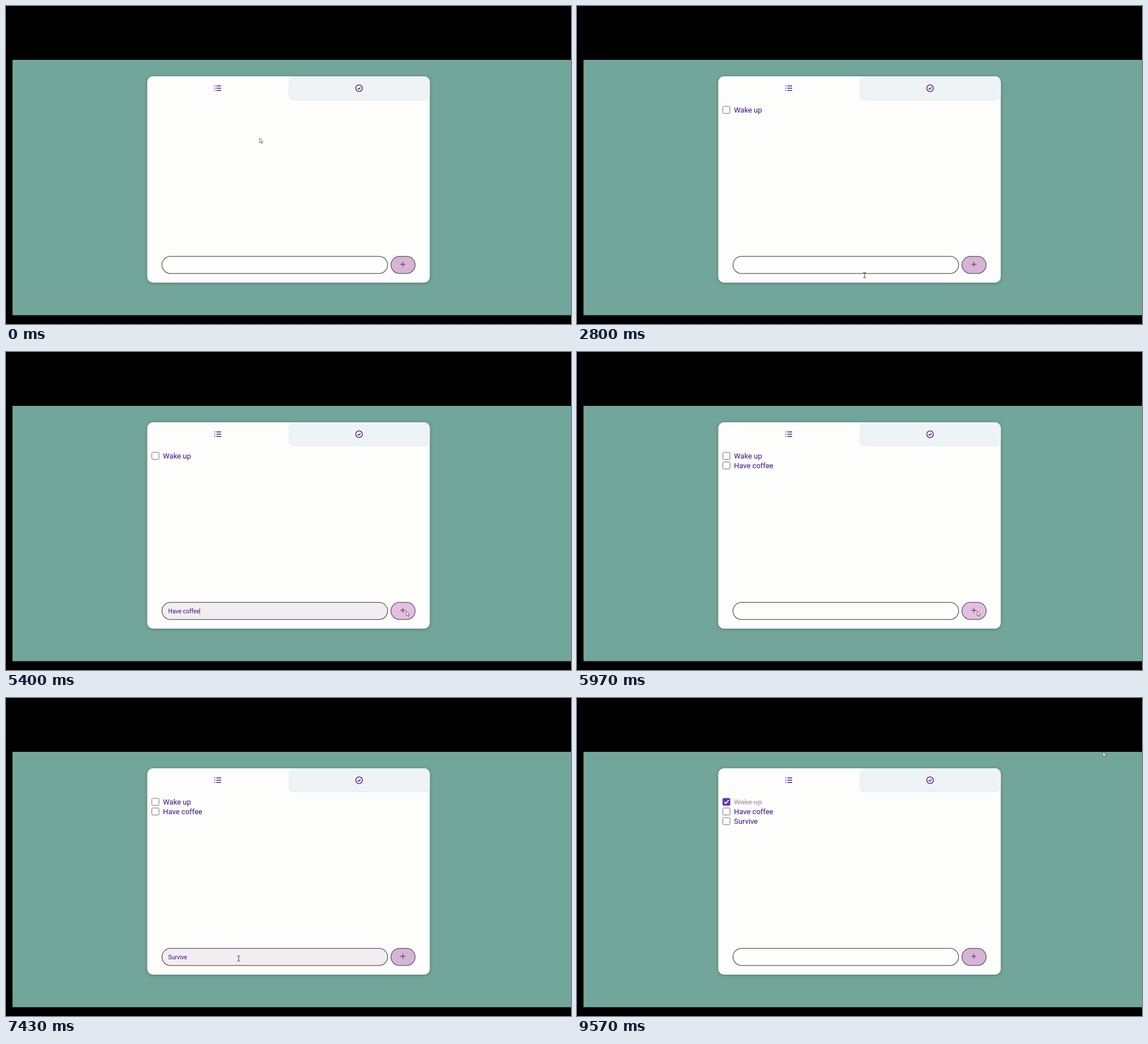
These frames come from a looping animation (998 px wide and 561 px high, 9610 ms). An HTML page:

```html
<!DOCTYPE html>
<html lang="en">
<head>
<meta charset="utf-8">
<title>To-do list</title>
<style>
  html, body { margin: 0; width: 100%; height: 100%; overflow: hidden; background: #000; }
  svg { display: block; width: 998px; height: 561px; }
  text { font-family: Roboto, Arial, sans-serif; fill: #38107c; white-space: pre; }
  .item { font-size: 13px; }
  .entry { font-size: 10.4px; }
  .line { fill: none; stroke: #4b1a80; stroke-width: 1.4; }
  .edge { stroke: #5d5760; stroke-width: 1.3; }
  .card { filter: drop-shadow(0 1px 3px rgba(0, 0, 0, .28)); }
  .box { fill: #fdfdfb; stroke: #77737a; }
  .mark { display: none; }
  .done .box { fill: #6036b4; stroke: #6036b4; }
  .done .item { fill: #aaa4ae; }
  .done .mark { display: inline; }
</style>
</head>
<body>
<svg viewBox="0 0 998 561">
  <rect width="998" height="561"/>
  <rect x="11.5" y="95" width="987" height="450.5" fill="#73a69a"/>
  <rect class="card" x="249.5" y="124" width="499" height="364" rx="10" fill="#fdfdfb"/>
  <rect x="499" y="124" width="249.5" height="41.5" rx="10" fill="#eef3f6"/>
  <path d="M500 157Q501 165.500 509 165.500H738Q747 165.500 748 157" fill="none" stroke="#dce4e8" stroke-width=".8"/>

  <path class="line" d="M371.500 141H380M371.500 145H380M371.500 149H380M368 141h1.500M368 145h1.500M368 149h1.500"/>
  <circle class="line" cx="623.700" cy="145" r="5.900"/>
  <path class="line" d="M621.200 145.200l1.700 1.700 3.400-3.500"/>

  <g id="list"></g>

  <rect id="field" class="edge" x="275.500" y="441.700" width="398.500" height="30.200" rx="15.100"/>
  <text id="entry" class="entry" x="286.500" y="460.500"></text>
  <path id="caret" d="M0 451V462.500" stroke="#33264a" stroke-width=".8"/>
  <rect id="button" class="edge" x="680" y="441.700" width="42.700" height="30.200" rx="15.100"/>
  <path d="M696.500 455.700h9M701 451.200v9" stroke="#4e4456" stroke-width="1.2"/>

  <path id="arrow" d="M0 0V8.600L2 6.900 3.400 9.800 4.700 9.200 3.300 6.400H5.900Z"
        fill="#fff" stroke="#4a4a56" stroke-width=".8" stroke-linejoin="round"/>
  <path id="beam" d="M-2.500-4.500H-.7L0-4 .7-4.500H2.500M0-4V4M-2.500 4.500H-.7L0 4 .7 4.500H2.500"
        fill="none" stroke="#3c3a42" stroke-width="1"/>
</svg>
<script>
const LOOP = 9610, CHECK = 8560, FADE = 100;
const $ = id => document.getElementById(id);

// Each task: field focused, typed at an even pace, then added by a click.
const tasks = [
  { text: 'Wake up', focus: 680, type: 850, pace: 70, click: 1810 },
  { text: 'Have coffee', focus: 2960, type: 3890, pace: 65, click: 5430 },
  { text: 'Survive', focus: 6480, type: 6700, pace: 90, click: 7850 }
];

// Pointer moves, each ending at `at` after `time` ms.
const rest = { x: 448, y: 233 };
const toButton = task => ({ at: task.click - 60, time: 300, x: 707, y: 457 });
const moves = [
  { at: 600, time: 480, x: 505, y: 453 },
  toButton(tasks[0]),
  { at: 2780, time: 600, x: 508, y: 475 },
  { at: 2920, time: 120, x: 508, y: 458 },
  toButton(tasks[1]),
  { at: 6450, time: 380, x: 411, y: 459.5 },
  toButton(tasks[2]),
  { at: CHECK - 60, time: 430, x: 262, y: 182 },
  { at: 9100, time: 440, x: 929, y: 95 }
];

const clamp = v => Math.max(0, Math.min(1, v));
const ease = v => v * v * (3 - 2 * v);
const lerp = (a, b, p) => a + (b - a) * p;
const mix = (a, b, p) => `rgb(${a.map((v, i) => lerp(v, b[i], p))})`;
const show = (el, on) => el.setAttribute('visibility', on ? 'visible' : 'hidden');

const pointerAt = t => moves.reduce((pos, m) => {
  const p = ease(clamp((t - m.at + m.time) / m.time));
  return { x: lerp(pos.x, m.x, p), y: lerp(pos.y, m.y, p) };
}, rest);

$('list').innerHTML = tasks.map((task, i) => `
  <g transform="translate(257.600 ${177 + 17 * i})">
    <rect class="box" width="12.600" height="12.400" rx="1.600"/>
    <text class="item" x="19.700" y="11.200">${task.text}</text>
    <g class="mark" fill="none">
      <path d="M2.700 6.300l2.600 2.800 5-6" stroke="#fff" stroke-width="1.800"/>
      <path d="M19.700 7H69.400" stroke="#a49ea8"/>
    </g>
  </g>`).join('');
const rows = [...$('list').children];

function drawField(t) {
  const task = tasks.find(k => t >= k.focus && t < k.click + FADE / 2);
  const count = task ? Math.floor((t - task.type) / task.pace) + 1 : 0;
  $('entry').textContent = task ? task.text.slice(0, Math.max(0, count)) : '';

  const focus = task ? clamp((t - task.focus) / FADE) * clamp(1 - (t - task.click) / FADE) : 0;
  $('field').style.fill = mix([253, 253, 251], [243, 237, 242], focus);
  $('caret').setAttribute('transform', `translate(${286.7 + $('entry').getComputedTextLength()})`);
  show($('caret'), task && task !== tasks[2] && t < task.click);
}

function drawList(t) {
  rows.forEach((row, i) => show(row, t >= tasks[i].click + FADE / 2));
  rows[0].classList.toggle('done', t >= CHECK);
}

function drawPointer(t) {
  const { x, y } = pointerAt(t);
  const inField = x > 276 && x < 674 && y > 441 && y < 477;
  const onButton = x >= 680 && x < 723 && y > 441 && y < 472;
  $('button').style.fill = onButton ? '#e3bfe2' : '#d6b4d6';
  for (const id of ['arrow', 'beam']) {
    $(id).setAttribute('transform', `translate(${x} ${y})`);
    show($(id), (id === 'beam') === inField);
  }
}

const start = performance.now();
function tick() {
  const t = (performance.now() - start) % LOOP;
  drawField(t);
  drawList(t);
  drawPointer(t);
  requestAnimationFrame(tick);
}
tick();
</script>
</body>
</html>
```
